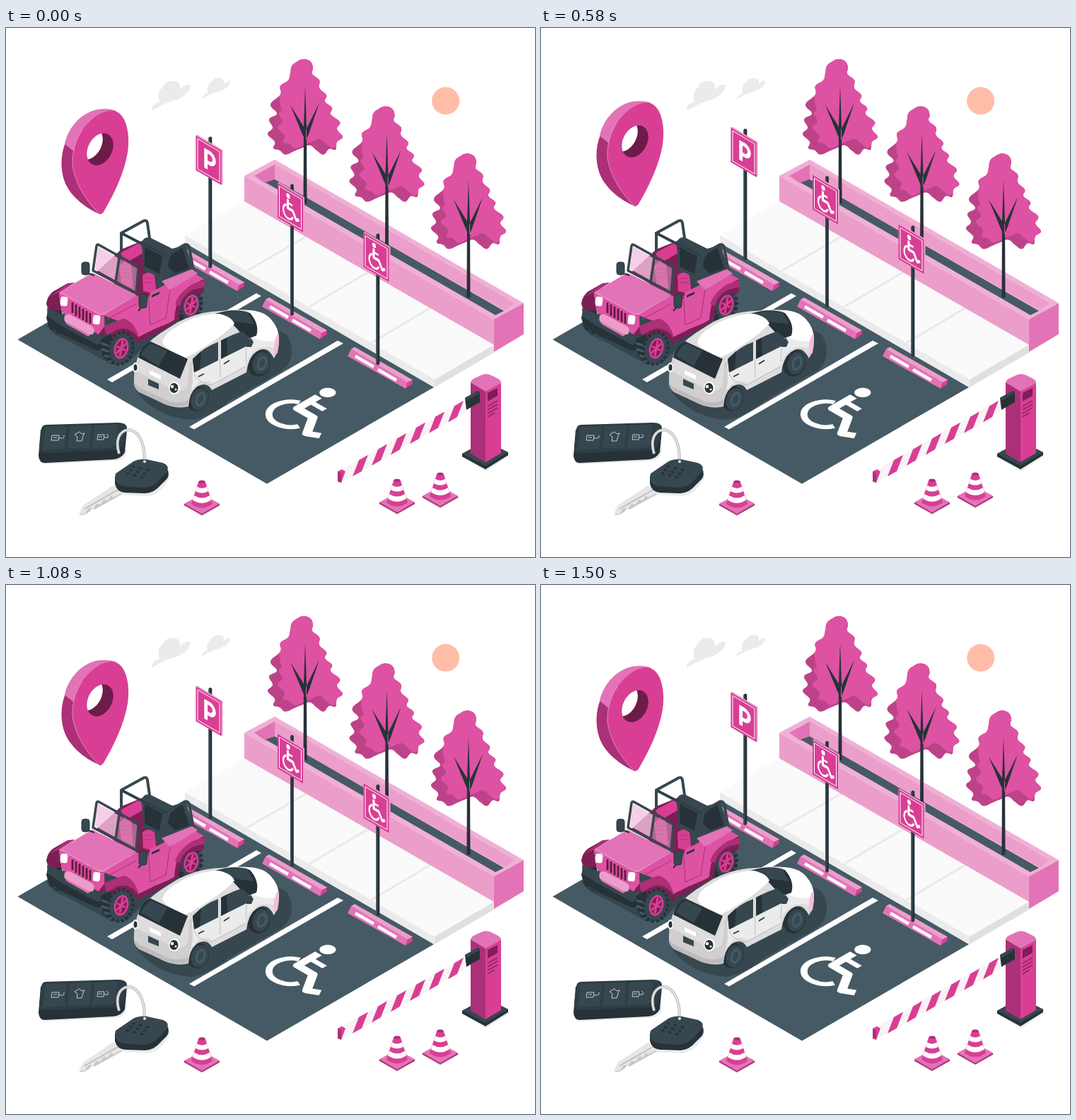
Write an HTML page that moves like this. It is 748 px wide and 748 px high and loops after 1540 ms.

```html
<!DOCTYPE html>
<html lang="en">
<head>
<meta charset="utf-8">
<title>Accessible parking</title>
<style>
html,body{margin:0;width:100%;height:100%;overflow:hidden;background:#fff}
svg{display:block;width:100vw;height:100vh}
.n{fill:none}
.w{fill:#fff}
.d{fill:#263238}
.s{fill:#37474f}
.a{fill:#455a64}
.p{fill:#d83f94}
.b{fill:#dd52a2}
.l{fill:#e273b6}
.x{fill:#ec9ecb}
.k{fill:#7d1f55}
.m{fill:#ab3077}
.g{fill:#ebebeb}
</style>
</head>
<body>
<svg viewBox="0 0 748 748" xmlns="http://www.w3.org/2000/svg">
<defs>
  <clipPath id="crownClip"><path class="crown"/></clipPath>
  <clipPath id="holeClip"><use href="#hole"/></clipPath>
  <ellipse id="hole" cx="133" cy="171.500" rx="17" ry="24" transform="rotate(28 133 171.500)"/>
  <g id="tree">
    <path class="crown" fill="#bd4389"/>
    <g clip-path="url(#crownClip)"><path class="crown" fill="#dd52a2" transform="translate(14 -9)"/><path fill="#dd52a2" d="M380 40h80l20 113-12 5-66-4-14-44z"/></g>
    <path class="d" d="M423 82L425 140 425.500 248H420.500L421 140ZM402 109L423 143V159L419 150ZM443 106L424 144V159L428 150Z"/>
  </g>
  <g id="chair" fill="none" stroke="#fff" stroke-linejoin="round">
    <circle class="w" cx="0" cy="-61" r="9.500" stroke="none"/>
    <path stroke-width="11" d="M-2-48V-14H23L41 14 55 6"/>
    <path stroke-width="7.500" d="M0-34H22"/>
    <path stroke-width="8" d="M-9-24A25.500 25.500 0 1 0 24 10"/>
  </g>
  <g id="stop">
    <path class="p" d="M447 430L453 427 454 433 444 440Z"/>
    <path class="l" d="M367 384L447 430 444 440 362 394Z"/>
    <path class="x" d="M367 384L372 381 454 427.500 447 431Z"/>
    <path class="w" d="M374 392L400 407 398 411 372 396ZM406 411L432 426 430 430 404 415Z"/>
  </g>
  <g id="sign">
    <path class="d" d="M286.500 155Q289 152 291.300 155V338Q289 341 286.500 338Z"/>
    <path class="s" d="M286.500 155H288.500V339H286.500Z"/>
    <path class="x" d="M268.500 152L270.500 151 306.500 172.500V221L304.500 222 268.500 201Z"/>
    <path class="p" d="M268.500 152L304.500 173.500V222L268.500 201Z"/>
    <path class="n" stroke="#fff" d="M271 156.500L302 175V217.500L271 199.300Z"/>
  </g>
  <g id="cone">
    <path class="g" d="M250 674L277 661 304 674 277 691Z"/>
    <path class="m" d="M252 673V675L277 689 302 675V673Z"/>
    <path class="l" d="M252 672.500L277 659 302 672.500 277 687Z"/>
    <path class="p" d="M272 642Q277 638 282 642L292 673Q277 684 262 673Z"/>
    <path class="w" d="M270 648.500Q277 653 284 648.500L286 655Q277 660 268 655ZM266 661Q277 668 288 661L290 667.500Q277 676 264 667.500Z"/>
    <ellipse class="m" cx="277" cy="641.500" rx="4.500" ry="2"/>
  </g>
</defs>

<!-- sky -->
<path class="g" d="M206 117C206 110 210 107 217 104 214 96 216 87 222 84 225 74 236 73 243 77 246 79 246 82 246 87 252 80 260 78 261 82 260 92 248 99 239 102 230 104 216 111 206 117ZM276 101C277 96 280 94 285 92 283 84 286 79 290 77 293 70 303 69 307 73 308 76 308 78 308 80 312 75 317 73 317 76 315 84 308 88 300 90 291 92 283 97 276 101Z"/>
<circle cx="621.700" cy="103" r="19.500" fill="#ffbda7"/>

<!-- pavement -->
<path fill="#fafafa" d="M253 293L337 245 690 448 606 497Z"/>
<path class="g" d="M253 293L606 497V508L253 304Z"/>
<path fill="#e0e0e0" d="M606 497L690 448V459L606 508Z"/>
<path class="n" stroke="#e9e9e9" stroke-width="3" d="M341 343L428 293M429 394L516 343M517 445L603 394"/>

<!-- planter -->
<path fill="#f0b0d6" d="M337 209L380 186 732 389 690 412Z"/>
<path class="l" d="M351 209L380 193V215L367 220Z"/>
<path class="x" d="M380 193L719 389 706 399 380 215Z"/>
<path class="a" d="M367 218.500L380 214 704 400 692 406Z"/>
<path class="x" d="M337 209L690 412V448L337 245Z"/>
<path class="l" d="M690 412L732 389V433L690 458Z"/>
<use href="#tree"/><use href="#tree" x="115.500" y="66.700"/><use href="#tree" x="231" y="133.500"/>

<!-- bays -->
<path class="a" d="M16.500 440.500L253 304 605 508 369 644.500Z"/>
<path class="w" d="M143 497L354 375 361 379 150 501ZM259 564L469 442 477 446 266 567.500Z"/>
<use href="#chair" transform="matrix(.866 .5 -.866 .5 402 546)"/>
<use href="#stop" x="-117" y="-68"/><use href="#stop"/><use href="#stop" x="121" y="70"/>

<g class="float">
  <use href="#sign"/>
  <path class="n" stroke="#fff" stroke-width="5.500" transform="matrix(.866 .5 0 1 287 187)" d="M-5 14V-11H1A7 7 0 0 1 1 4H-5"/>
  <use href="#sign" x="115.500" y="67"/>
  <use href="#chair" transform="matrix(.28 .165 0 .37 399 260)"/>
  <use href="#sign" x="237" y="137"/>
  <use href="#chair" transform="matrix(.28 .165 0 .37 520.500 330)"/>
</g>

<!-- pin -->
<g class="float">
  <path class="m" d="M84 162C76 182 77 205 85 222 95 242 116 256 132 263L140 200 100 165Z"/>
  <path class="l" d="M83 164C88 139 109 118 131 115Q145 113 155 117L150 160 98 176Z"/>
  <path class="p" d="M131 262.500Q135 265 138 260C152 236 167 206 172 176 176 147 169 121 153 117 137 114 118 130 108 144 97 160 93 180 94 194 98 222 115 246 131 262.500Z"/>
  <path class="n" stroke="#eb9acb" stroke-width=".8" d="M131 262C115 246 98 222 94 194 93 180 97 160 108 144"/>
  <use href="#hole" fill="#6d1c4a"/>
  <g clip-path="url(#holeClip)"><use class="w" href="#hole" x="-15" y="-8"/></g>
</g>

<!-- jeep -->
<g>
  <path fill="#35464f" d="M57 420L110 395 235 400 277 402 238 420 205 440 172 474 150 476 95 446 70 434Z"/>
  <path class="d" d="M60 397L78 394 82 425 74 433 62 426 57 410Z"/>
  <path class="n" stroke="#37474f" stroke-width="3" d="M59 402l16 4M59 410l17 4M62 419l15 4M67 427l14 3"/>
  <ellipse class="d" cx="256" cy="393" rx="18" ry="23" transform="rotate(14 256 393)"/>
  <ellipse class="s" cx="261" cy="392" rx="15" ry="21" transform="rotate(14 261 392)" stroke="#263238" stroke-width="5" stroke-dasharray="4 3"/>
  <path class="k" d="M128 345L163 313 195 300 229 330 232 362 190 385Z"/>
  <path class="p" d="M162 318L190 303 194 318 168 333Z"/>
  <path class="s" d="M192 304Q194 295 203 296L235 312 254 307 265 341 241 349 218 371 194 342Z"/>
  <path class="d" d="M196 305L222 318 217 348 196 337ZM233 316L249 310 259 340 239 347 229 337Z"/>
  <path class="p" d="M160 337Q167 327 177 334L180 369 163 361ZM193 350Q201 342 210 350L213 377 194 372Z"/>
  <path class="n" stroke="#ab3077" d="M163 340L175 341M163 346L175 347M163 352L175 353M196 354L208 354M196 360L208 360"/>
  <path class="n" stroke="#37474f" stroke-width="4" stroke-linejoin="round" stroke-linecap="round" d="M163 316V290L195 272.500Q199 271 200 276L203 297M163 290L228 324 226 360M228 324L238 315 252 307Q257 305 259 310L265 343"/>
  <path class="n" stroke="#263238" d="M165 291L228 323"/>

  <path fill="#f3c3e0" opacity=".8" d="M126 341L130 309 160 326 155 357Z"/>
  <path fill="#d99fc1" opacity=".55" d="M155 357L160 326 186 340 184 373Z"/>
  <path class="n" stroke="#37474f" stroke-width="3.500" stroke-linejoin="round" d="M123 343L128 308Q129 305 132 307L184 336Q188 338 187 342L184 375ZM155 359L160 325"/>

  <path class="b" d="M137 406L184 378 201 385 204 374 229 361 234 369 266 347 280 355 281 364 248 381 239 412 211 429 190 440 166 417Z"/>
  <path class="l" d="M220 358L263 341 271 347 238 367 231 370Z"/>
  <path class="n" stroke="#ab3077" d="M202 386L204 420 226 410 232 370M143 412L184 390M186 378L203 388"/>
  <path class="d" d="M206 378L217 373V376L206 381Z"/>
  <path class="k" d="M238 414C239 392 244 377 263 364L280 355V372L275 378C267 371 250 378 247 399L244 413 209 435 188 444 187 437 209 426Z"/>
  <path class="m" d="M239 391Q244 374 264 362L281 357V366L265 370Q250 377 246 393Z"/>

  <path class="l" d="M75 374L122 346 184 377 138 406Q132 407 127 404Z"/>
  <path class="n" stroke="#ee9ccd" d="M76 373L127 402Q133 406 139 404L184 378"/>
  <path class="b" d="M75 374L127 403Q135 408 139 406L140 439 79 402Z"/>
  <path class="k" d="M57 390Q58 380 66 373L87 361 97 360 75 374 78 399 66 400 59 396Z"/>
  <path class="m" d="M61 380L86 362 97 360 75 374Z"/>
  <path class="k" d="M125 441L140 421 165 413Q182 418 187 440V449Q178 430 164 432 149 434 145 451Z"/>
  <path class="m" d="M139 421L166 411Q182 414 188 439 178 425 166 425 151 425 142 440Z"/>
  <path class="n" stroke="#5c1a3f" stroke-width="2.800" d="M94 388V403M99 391V407M104 394V410M109 397V413M114 400V416M119 403V418"/>
  <rect class="w" x="77" y="380" width="10" height="13" rx="3" transform="rotate(6 82 387)"/>
  <rect class="w" x="123" y="406" width="10" height="13" rx="3" transform="rotate(6 128 413)"/>
  <path class="s" d="M58 396L78 404 131 435 143 432 142 446 129 452 80 426 59 410Z"/>
  <path class="d" d="M59 408L80 422 129 448 140 444V455L128 456 80 434 60 421Z"/>
  <path class="x" d="M83 407Q87 403 92 406L122 422Q127 426 123 433L116 434 85 417Q81 413 83 407Z"/>
  <path class="l" d="M84 415L119 434 116 436 86 419Z"/>

  <path class="d" d="M134 440L148 432 160 475 148 475 137 464Z"/>
  <path class="n" stroke="#455a64" stroke-width="3" d="M135 446l14 4M135 454l15 5M139 463l14 5M145 471l11 3"/>
  <ellipse class="s" cx="162" cy="453" rx="17" ry="23" transform="rotate(14 162 453)" stroke="#263238" stroke-width="4" stroke-dasharray="4 3"/>
  <g id="hub">
    <ellipse class="p" cx="163" cy="453" rx="10" ry="15" transform="rotate(14 163 453)"/>
    <ellipse class="k" cx="163" cy="453" rx="7.500" ry="12" transform="rotate(14 163 453)"/>
    <path class="n" stroke="#d83f94" stroke-width="3" d="M165 442L161 464M157 450L169 456M170 446L156 460"/>
  </g>
  <use href="#hub" x="99" y="-61"/>
  <path class="n" stroke="#263238" stroke-width="2" d="M114 346L125 350M194 392L187 400"/>
  <rect class="s" x="107" y="331" width="11" height="18" rx="4" stroke="#263238"/>
  <rect class="s" x="188" y="376" width="11" height="20" rx="4" stroke="#263238"/>
</g>

<!-- hatchback -->
<g>
  <path fill="#37474f" d="M183 512Q210 550 262 554 290 550 315 528L385 488Q405 477 404 455 402 430 384 428L300 480Z"/>
  <ellipse class="d" cx="358" cy="474" rx="16" ry="19" transform="rotate(18 358 474)"/>
  <ellipse class="d" cx="271" cy="524" rx="16" ry="18" transform="rotate(18 271 524)"/>
  <path fill="#dedcdc" d="M181 502Q180 478 190 457 206 438 230 424 263 401 305 400 341 395 365 404 384 418 386 439 386 456 379 467 370 449 357 456 343 463 340 487L291 512Q285 500 272 506 259 514 258 535 242 539 225 532L190 515Q182 510 181 502Z"/>
  <path class="g" d="M265 467Q300 441 347 432L386 438 384 455Q374 449 359 452 343 459 338 478L292 503Q286 496 273 501L262 512Z"/>
  <path class="w" d="M341 399Q362 399 374 411 386 424 386 440 371 447 350 438Z"/>
  <path class="d" d="M296 404Q324 395 345 403 359 419 354 435L340 440 318 416Z"/>
  <path class="s" d="M302 404Q326 397 342 403L351 419 322 415Z"/>
  <path class="w" d="M221 444Q224 432 240 423 269 404 301 404 319 408 323 418 306 437 264 461L253 466Q225 455 221 444Z"/>
  <path fill="#d0cece" d="M181 501Q182 479 189 466L246 495Q253 481 263 470L264 501 257 534Q240 538 225 532L188 514Q181 510 181 501Z"/>
  <path fill="#dedcdc" d="M184 483L190 467 246 495 259 475 257 505Q250 519 233 510L188 487Z"/>
  <path class="d" d="M187 466Q190 450 204 443L257 468 246 496Z"/>
  <path class="s" d="M191 463Q195 452 205 446L228 457 216 478Z"/>
  <path class="s" d="M264 468Q280 451 300 444V470L266 487ZM304 442Q320 433 334 429L344 438 340 450 304 468Z"/>
  <path class="d" d="M264 468L276 457 274 483 266 487ZM304 442L312 438 313 463 304 468Z"/>
  <path class="n" stroke="#bdbdbd" d="M302 446L303 494M266 489Q270 501 290 505L338 479M340 452L339 472"/>
  <path class="n" stroke="#263238" stroke-width="1.600" d="M272 493L280 489M308 475L316 470"/>
  <path class="s" d="M340 442L346 438 350 444 347 451 340 451Z"/>
  <path fill="#bdbbbb" d="M181 502L188 508 231 528Q245 532 258 526L257 534Q240 538 225 532L188 515Q182 511 181 502Z"/>
  <path class="w" d="M203 484L219 491V497L203 490Z"/>
  <path class="s" d="M201 496L216 503V511L201 505Z"/>
  <ellipse class="w" cx="183" cy="480" rx="4" ry="7"/><ellipse class="d" cx="183" cy="480" rx="2.500" ry="4.500"/>
  <ellipse class="w" cx="238" cy="509" rx="8" ry="9"/><ellipse class="d" cx="237.500" cy="509" rx="6" ry="7"/><circle class="w" cx="235" cy="507" r="2.300"/><circle class="w" cx="240" cy="511" r="1.500"/>
  <path fill="#f3bddc" d="M385 431Q387 445 384 459L379 465Q377 443 385 431Z"/>
  <g id="wheel">
    <ellipse class="s" cx="274" cy="525" rx="12" ry="16" transform="rotate(18 274 525)"/>
    <ellipse class="a" cx="275" cy="525" rx="7" ry="11" transform="rotate(18 275 525)"/>
    <ellipse class="s" cx="275" cy="525" rx="4" ry="7" transform="rotate(18 275 525)"/>
  </g>
  <use href="#wheel" x="87" y="-51"/>
</g>

<!-- barrier -->
<path class="g" d="M643 605L678 586 713 605 678 627Z"/>
<path class="d" d="M645 602V606L678 624 710 604V600L678 584Z"/>
<path class="s" d="M645 602L678 584 710 600 678 619Z"/>
<path class="m" d="M657 501L678 513V614L657 602Z"/>
<path class="p" d="M678 513L700 501V601L678 614Z"/>
<path class="l" d="M657 501Q658 497 663 495L674 490Q680 488 686 491L696 496Q700 498 700 502L678 514Z"/>
<path class="k" d="M681 516L695 509V520L681 528Z"/>
<path class="n" stroke="#8d2860" stroke-width="1.500" d="M681 535L695 527M681 540L695 532M681 545L695 537M681 550L691 544"/>
<path fill="#f8f3f6" d="M470 627L650 525V543L474 643 469 641Z"/>
<path id="bands" class="p"/>
<path class="p" d="M469 627L475 624 480 627 474 643 469 641Z"/>
<path class="m" d="M469 627L474 630V643L469 641Z"/>
<path class="d" d="M649 523L668 513 670 516V529L651 540Z"/>
<path class="s" d="M649 523L665 514 670 516 652 527Z"/>

<use href="#cone"/><use href="#cone" x="276" y="-2"/><use href="#cone" x="337" y="-11"/>

<!-- keys -->
<path class="g" d="M47 609Q48 616 55 617L156 612Q166 611 170 602L171 596 50 600Z"/>
<path class="d" d="M49 568L46 605Q47 615 55 615L152 610Q163 609 168 600L171 568Z"/>
<path fill="#2f3d45" d="M50 567Q51 561 57 561L158 558Q171 558 171 566L167 587Q163 596 152 597L55 601Q46 601 47 593Z"/>
<path class="s" d="M56 564L86 563 83 595 52 597ZM90 563L121 562 118 594 87 595ZM125 562L154 561Q159 561 158 565L154 589Q153 593 148 593L122 594Z"/>
<g fill="none" stroke="#dadada" stroke-width=".9">
  <path d="M65 576H75L74 583H64ZM75 580H80Q83 579 82 576M67 579H72M130 575H139L138 582H129ZM139 579H144Q146 576 142 574M131 578H136"/>
  <path d="M100 573L104 571 107 574 111 573 109 577 107 584 100 584 101 578 97 575Z"/>
</g>
<path class="n" stroke="#bdbdbd" stroke-width="4" d="M160 602C154 583 160 569 174 568 190 570 198 594 195 615"/>
<path class="n" stroke="#eee" stroke-width="1.500" d="M160 602C154 583 160 569 174 568 190 570 198 594 195 615"/>
<path fill="#c7c7c7" d="M104 689L110 680 167 649 170 656 125 681 122 679 118 684 111 688Z"/>
<path fill="#e6e6e6" d="M103 687L109 675 151 647 168 653 163 658 151 664 149 661 144 668 138 667 134 674 128 673 124 679 117 679 111 687Z"/>
<path class="n" stroke="#bdbdbd" stroke-width="1.500" d="M111 680L160 652"/>
<path class="g" d="M154 642L164 660 201 662Q213 660 222 650L231 637V630Z"/>
<path class="d" d="M154 634V645Q157 656 168 657L197 658Q210 657 218 647L228 637Q231 632 229 625Z"/>
<path class="s" d="M155 630L180 613Q188 609 199 610L222 615Q231 618 228 627L216 640Q208 649 195 650L166 648Q151 644 155 630Z"/>
<g id="dots" class="d"></g>
<circle class="g" cx="196" cy="613" r="2"/>
</svg>
<script>
const $ = q => document.querySelectorAll(q);
const LOOP = 1540, LIFT = 13;

// closed smooth curve passing through the points
function blob(p) {
  const at = i => p[(i + p.length) % p.length];
  const ease = (a, b, c, s) => [0, 1].map(k => (b[k] + s * (c[k] - a[k]) / 5).toFixed(1)).join(' ');
  return `M${p[0]}` + p.map((a, i) => {
    const b = at(i + 1);
    return `C${ease(at(i - 1), a, b, 1)} ${ease(a, b, at(i + 2), -1)} ${b}`;
  }).join('') + 'Z';
}

const crown = blob([
  [420,44],[430,47],[434,56],[433,65],[443,74],[443,85],[453,95],[451,104],
  [461,113],[459,122],[472,133],[468,143],[476,154],[468,161],[466,172],[457,171],
  [449,179],[439,173],[430,166],[420,169],[408,174],[395,179],[387,173],[378,170],
  [380,161],[370,150],[377,141],[372,129],[383,121],[374,108],[388,94],[388,82],
  [399,74],[402,64],[404,54],[411,48]
]);
$('.crown').forEach(e => e.setAttribute('d', crown));

const slope = -.567;
let bands = '';
for (let i = 0; i < 6; i++) {
  const x = 490 + i * 27, y = 634 + (x - 490) * slope;
  bands += `M${x} ${y}l13 ${13 * slope} 9 -23 -13 ${-13 * slope}Z`;
}
$('#bands')[0].setAttribute('d', bands);

let dots = '';
for (let r = 0; r < 3; r++)
  for (let c = 0; c < 3; c++)
    dots += `<ellipse cx="${172 + c * 10 + r * 4}" cy="${630 + c * 2.5 - r * 5}" rx="2.5" ry="1.8"/>`;
$('#dots')[0].innerHTML = dots;

const floats = $('.float');
function draw(now) {
  const y = -LIFT / 2 * (1 - Math.cos(now % LOOP / LOOP * 2 * Math.PI));
  floats.forEach(e => e.setAttribute('transform', `translate(0 ${y.toFixed(2)})`));
  requestAnimationFrame(draw);
}
draw(0);
</script>
</body>
</html>
```
